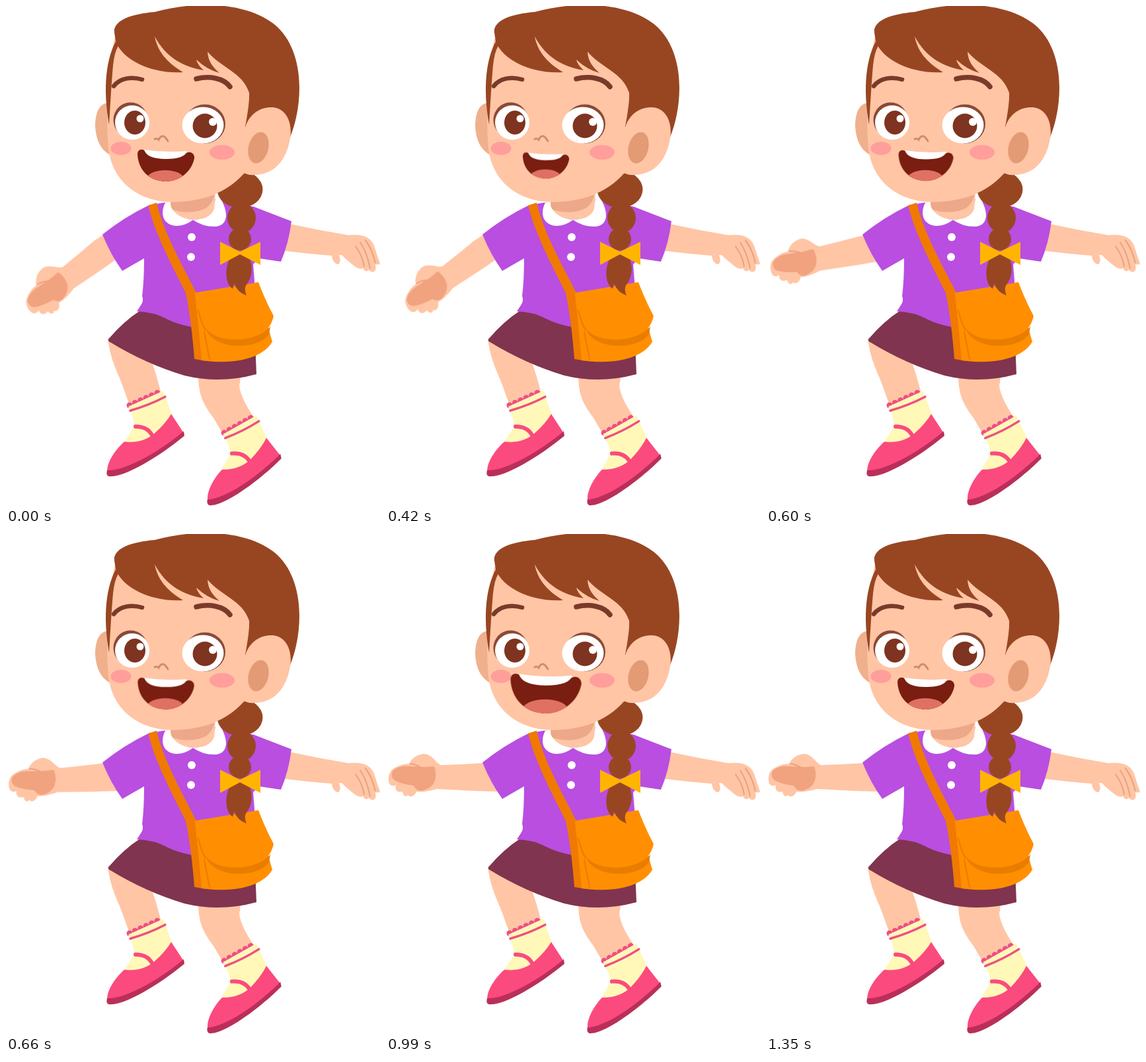
Recreate the animation shown at these times as an HTML page. Size 566 px wide and 755 px high, loop 1.8 s.

```html
<!DOCTYPE html>
<html lang="en">
<head>
<meta charset="utf-8">
<title>Waving girl</title>
<style>
  html, body { margin: 0; width: 100%; height: 100%; overflow: hidden; background: #fff; }
  svg { display: block; width: 100%; height: 100%; }

  .skin { fill: #ffc5a5; }
  .shade { fill: #eca888; }
  .palm { fill: #f1a27f; }
  .hair { fill: #984622; }
  .shirt { fill: #b94ee1; }
  .skirt { fill: #80344f; }
  .bag { fill: #ff8f00; }
  .trim { fill: #f07a00; }
  .sock { fill: #fff8b8; }
  .shoe { fill: #fb4a7e; }
  .sole { fill: #b92f5a; }
  .iris { fill: #7e3420; }
  .lash { fill: #8a4a36; }
  .inner { fill: #e29b74; }
  .blush { fill: #ff9e9b; }
  .white { fill: #fff; }
  .line { fill: none; stroke-linecap: round; }
  .pink { stroke: #ee4f82; }
  .brow { stroke: #7b3a29; }
  .crease { stroke: #e9a27f; stroke-width: 2; }

  .arm { transform-origin: 152px 368px; animation: raise 1.8s infinite; }
  .mouth { transform-origin: 242px 241px; animation: talk 1.8s infinite ease-in-out; }

  @keyframes raise {
    0%, 21.111% { transform: rotate(-37deg); animation-timing-function: ease-in-out; }
    41.111%, 100% { transform: rotate(0deg); }
  }
  @keyframes talk {
    0% { transform: scale(1); }
    16.667% { transform: scale(.775); }
    40% { transform: scale(1); }
    52.778% { transform: scale(1.25); }
    75%, 100% { transform: scale(1); }
  }
</style>
</head>
<body>
<svg viewBox="0 0 566 755" preserveAspectRatio="none">
  <defs>
    <clipPath id="lips">
      <path id="lipShape" d="M199 224C199 216 206 215 211 219Q241 223 273 222C280 218 286 224 285 230C281 250 263 265 241 265C215 264 200 246 199 224Z"/>
    </clipPath>
    <g id="foot">
      <path class="line pink" stroke-width="9" stroke-dasharray="0 9.2" d="M187 603L236 581"/>
      <path class="sock" d="M185 605L238 581L252 620L225 660L172 668L192 638Q197 629 185 605Z"/>
      <path class="line pink" stroke-width="3.5" stroke-linecap="butt" d="M188 611Q216 603 241 590"/>
      <path class="shoe" d="M179 658C196 660 213 656 225 645Q242 630 250 616L269 645C228 678 176 708 154 706C150 693 164 671 179 658Z"/>
      <path class="sole" d="M153 701C178 703 230 675 269 642L270 649C228 684 174 714 155 710Q151 708 153 701Z"/>
      <path class="line" stroke="#fb4a7e" stroke-width="6" d="M196 635Q214 635 221 648"/>
    </g>
  </defs>

  <!-- arms -->
  <g class="arm">
    <path class="skin" d="M83 349C75 345 69 332 57 332C46 333 38 340 35 347C24 347 13 352 8 357C3 364 3 371 5 377C8 381 12 381 15 379C13 386 17 391 25 389C26 396 30 398 33 394C36 398 43 397 46 389Q62 390 77 385Q125 388 172 389L182 385L185 353L160 347L146 346Q115 348 83 349Z"/>
    <path class="palm" d="M10 358C18 350 30 350 40 351C55 352 62 352 73 351C78 364 75 380 62 385C52 390 46 388 42 380Q25 378 13 372Q6 366 10 358Z"/>
    <path class="line crease" d="M37 347Q46 348 53 353"/>
  </g>
  <path class="skin" d="M424 328Q470 338 518 346Q538 344 547 350Q556 355 559 368L566 389Q562 392 559 389Q561 399 557 401Q552 403 549 398Q545 404 540 396Q535 398 529 394Q516 384 508 376L504 376Q508 387 503 390C496 389 494 383 493 377Q455 374 415 369Z"/>
  <path class="line crease" d="M544 354Q554 366 559 388M536 357Q546 371 551 396M529 363Q539 376 542 393"/>

  <!-- legs -->
  <path class="skin" d="M154 502Q157 530 172 562Q182 588 188 606L235 586Q229 560 218 530Z"/>
  <path class="skin" d="M291 555C291 588 298 600 314 622L328 646L376 622Q356 594 353 574L356 555Z"/>
  <use href="#foot"/>
  <use href="#foot" transform="translate(394 652) rotate(-5) translate(-250 -616)"/>

  <!-- clothes -->
  <path class="skirt" d="M203 460Q178 476 155 503V506Q210 540 270 558Q324 571 379 556L376 480Z"/>
  <path class="shirt" d="M216 301Q180 318 146 345Q158 375 176 400L209 381Q209 415 206 438Q209 445 204 452L198 461Q224 462 244 473Q266 484 300 487L378 440L374 390L383 381L416 386Q428 358 432 325L375 303L316 291L238 297Z"/>
  <path class="skin" d="M249 288L248 304Q256 320 283 323Q310 323 316 306L317 275Z"/>
  <path class="shade" d="M249 292Q290 294 316 278Q315 298 301 306Q278 316 250 307Z"/>
  <path class="white" d="M241 297C232 315 239 331 258 332Q271 332 283 323Q257 320 249 302L249 295Z"/>
  <path class="white" d="M318 280C338 308 338 330 318 333Q299 334 283 323Q310 322 315 306Z"/>
  <circle class="white" cx="281" cy="349" r="6"/>
  <circle class="white" cx="280" cy="379" r="6"/>

  <!-- bag -->
  <path class="trim" d="M215 301L228 297C238 340 264 386 287 431L302 536L285 533Q281 478 272 433C247 384 226 344 215 301Z"/>
  <path class="bag" d="M286 433L382 417Q393 446 405 468Q403 478 397 486L403 507C388 533 343 542 296 535Q291 480 286 433Z"/>
  <path fill="#e87d00" d="M302 485C314 509 376 511 400 484L398 496C378 522 310 519 302 485Z"/>
  <path class="line" stroke="#f07a00" stroke-width="2" d="M291 460Q296 480 302 489M300 492L308 533"/>

  <!-- braid -->
  <g class="hair">
    <ellipse cx="354" cy="277" rx="34.500" ry="28"/>
    <ellipse cx="356.500" cy="320" rx="21.500" ry="22.500"/>
    <ellipse cx="354" cy="352" rx="17" ry="17"/>
    <path d="M344 372C329 393 331 419 343 427L345 419Q351 433 364 437Q360 428 363 422C375 407 374 389 365 373Z"/>
  </g>
  <path fill="#ffb400" d="M324 356L354 371L385 356V391L354 375L324 391Z"/>

  <!-- head -->
  <path fill="#f0b08d" d="M160 147C141 143 135 162 135 181C136 203 144 219 160 226Z"/>
  <path class="skin" d="M164 50C153 100 151 170 155 214C160 266 202 296 252 296C302 296 340 279 366 246L385 130L330 50L230 20Z"/>
  <path class="hair" d="M167 52C152 78 146 122 156 179Q160 110 162 90Q164 70 170 60Z"/>
  <path class="hair" d="M164 40C162 22 189 12 225 9C300 -11 373 -2 410 31C454 72 449 152 430 198L362 182Q369 145 368 131C358 100 325 93 305 69C306 85 314 93 323 101Q304 96 288 81Q290 89 299 97C269 92 243 79 225 46C230 72 248 88 268 100C222 103 178 83 166 54Z"/>
  <path class="skin" d="M363 180C371 160 388 152 404 153C424 155 434 176 430 200C426 225 412 254 376 255Q366 256 358 251Z"/>
  <ellipse class="inner" cx="382" cy="214" rx="15" ry="24" transform="rotate(14 382 214)"/>

  <!-- face -->
  <path class="line brow" stroke-width="6.500" d="M163 121C172 109 190 106 206 111"/>
  <path class="line brow" stroke-width="7.500" d="M288 110C308 105 330 109 339 122"/>
  <ellipse class="lash" cx="188.500" cy="172" rx="26" ry="26.500"/>
  <ellipse class="white" cx="191" cy="176" rx="26" ry="26"/>
  <ellipse class="iris" cx="195" cy="176" rx="16" ry="18"/>
  <circle class="white" cx="203" cy="170" r="5.500"/>
  <ellipse class="lash" cx="301" cy="178" rx="31" ry="29.500"/>
  <ellipse class="white" cx="298" cy="180" rx="31.500" ry="27.500"/>
  <circle class="iris" cx="301" cy="181" r="18.500"/>
  <circle class="white" cx="313" cy="175" r="6"/>
  <path class="line" stroke="#cf8e6a" stroke-width="3" d="M225 201Q229 199 231 202Q237 190 245 204"/>
  <ellipse class="blush" cx="174" cy="215" rx="15.500" ry="10"/>
  <ellipse class="blush" cx="327" cy="221" rx="19" ry="11"/>

  <g class="mouth">
    <use href="#lipShape" fill="#791e10"/>
    <ellipse cx="241" cy="261" rx="28" ry="13" fill="#e07162" clip-path="url(#lips)"/>
    <path class="white" d="M209 217Q241 222 274 219Q271 231 242 231Q213 231 209 217Z"/>
  </g>
</svg>
</body>
</html>
```
